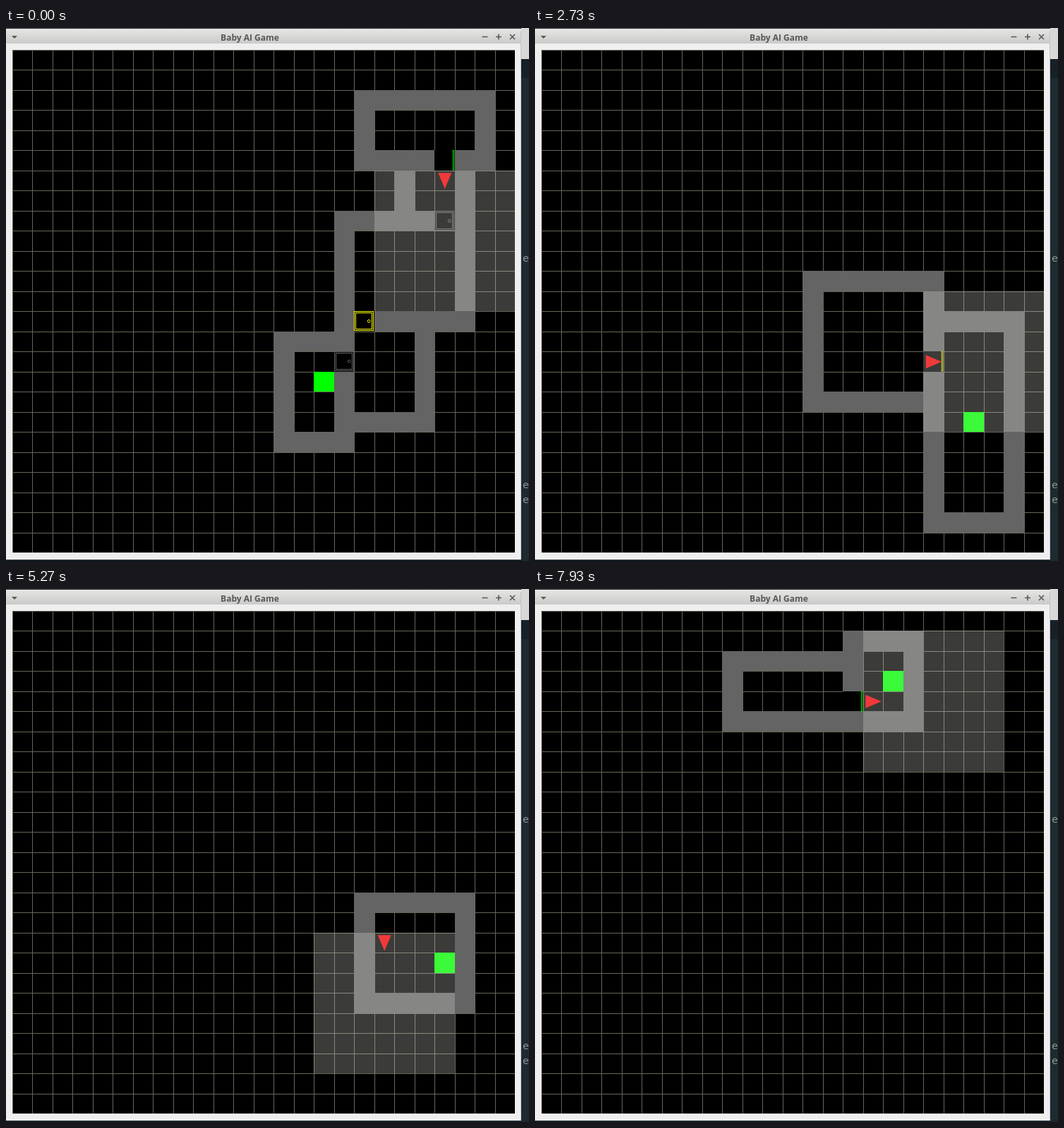
An HTML page with a canvas for the animation above (8000 ms loop, 741x755 px).

```html
<!DOCTYPE html>
<html lang="en">
<head>
<meta charset="utf-8">
<title>Baby AI Game</title>
<style>
html, body { margin: 0; width: 100%; height: 100%; overflow: hidden; background: #1d2a30; }
canvas { display: block; }
</style>
</head>
<body>
<canvas id="stage" width="741" height="755"></canvas>
<script>
const ctx = document.getElementById('stage').getContext('2d');
const CELL = 28.5, LEFT = 9, TOP = 31, SIZE = 25, VIEW = 7;
const STEP = 200 / 3, LOOP = 8000;
const RIGHT = 0, DOWN = 1, UP = 3;
const DX = [1, 0, -1, 0], DY = [0, 1, 0, -1];
const COLOR = {
  grey: '#646464', green: '#00ff00', yellow: '#ffff00',
  red: '#ff0000', purple: '#7027c3', blue: '#0000ff'
};

// rooms: wall box [x, y, w, h]; doors are listed in the order they are opened.
// moves: F forward, L/R turn, T open a door, W wait; lower case shares a step with the next move.
const levels = [
  { rooms: [[17, 2, 7, 4], [19, 5, 4, 4], [16, 8, 7, 6], [16, 13, 5, 6], [13, 14, 4, 6]],
    doors: [[21, 5, 'green'], [21, 8, 'grey'], [17, 13, 'yellow'], [16, 15, 'grey']],
    goal: [15, 16], start: [21, 6, DOWN], open: 1, moves: 'WFTFFFFFRFFFFLTFFFRTFFLF' },
  { rooms: [[19, 8, 5, 5]], doors: [],
    goal: [21, 10], start: [20, 11, UP], moves: 'FFRFRF' },
  { rooms: [[13, 11, 7, 7], [19, 13, 5, 11]], doors: [[19, 15, 'yellow']],
    goal: [21, 18], start: [14, 13, DOWN], moves: 'FFLFFFFTFFFRFF' },
  { rooms: [[4, 2, 5, 5], [8, 0, 6, 7], [13, 2, 7, 5], [19, 1, 4, 7], [18, 7, 4, 7]],
    doors: [[8, 3, 'green'], [13, 4, 'purple'], [19, 4, 'red'], [20, 7, 'grey']],
    goal: [19, 10], start: [6, 5, DOWN], moves: 'LLFFRFTFFfFFRFLTFFfFFFTFFRFFTFFfFR' },
  { rooms: [[17, 14, 6, 6]], doors: [],
    goal: [21, 17], start: [18, 16, DOWN], moves: 'LFFFR' },
  { rooms: [[2, 1, 6, 4], [3, 4, 5, 5], [2, 8, 7, 4], [0, 11, 6, 6]],
    doors: [[4, 4, 'blue'], [5, 8, 'red'], [4, 11, 'purple']],
    goal: [4, 13], start: [4, 3, UP], moves: 'RRTFFFFLFRTfFRFLFTFF' },
  { rooms: [[5, 7, 4, 7], [8, 7, 6, 4]], doors: [[8, 9, 'yellow']],
    goal: [9, 8], start: [6, 8, DOWN], moves: 'FLFTfFL' },
  { rooms: [[9, 2, 7, 4], [15, 1, 4, 5]], doors: [[15, 4, 'green']],
    goal: [17, 3], start: [13, 3, RIGHT], moves: 'RFLFTFF' }
];

// Play every level once and keep the state after each step.
const states = [];
for (const level of levels) {
  let [x, y, dir] = level.start, open = level.open || 0;
  const save = () => states.push({ level, x, y, dir, open });
  save();
  for (const move of level.moves) {
    const m = move.toUpperCase();
    if (m === 'F') { x += DX[dir]; y += DY[dir]; }
    if (m === 'L') dir = (dir + 3) % 4;
    if (m === 'R') dir = (dir + 1) % 4;
    if (m === 'T') open++;
    if (move === m) save();
  }
}

const px = i => Math.floor(LEFT + i * CELL);
const py = j => Math.floor(TOP + j * CELL);

function rect(x, y, w, h, fill) {
  ctx.fillStyle = fill;
  ctx.fillRect(x, y, w, h);
}

function cells(x, y, w, h, fill) {
  rect(px(x), py(y), px(x + w) - px(x), py(y + h) - py(y), fill);
}

function line(color, width, ...p) {
  ctx.strokeStyle = color;
  ctx.lineWidth = width;
  ctx.beginPath();
  for (let i = 0; i < p.length; i += 4) {
    ctx.moveTo(p[i], p[i + 1]);
    ctx.lineTo(p[i + 2], p[i + 3]);
  }
  ctx.stroke();
}

function triangle(color, ...p) {
  ctx.fillStyle = color;
  ctx.beginPath();
  for (let i = 0; i < 6; i += 2) ctx.lineTo(p[i], p[i + 1]);
  ctx.fill();
}

function drawWindow() {
  rect(0, 0, 741, 755, '#1d2a30');
  rect(730, 0, 11, 44, '#d8d8d8');
  rect(730, 44, 11, 27, '#172026');
  ctx.textAlign = 'left';
  ctx.fillStyle = '#8d979b';
  ctx.font = '15px "Noto Sans Mono", monospace';
  for (const y of [331, 652, 673]) ctx.fillText('e', 732, y);

  rect(0, 1, 730, 752, '#f0eff0');
  const bar = ctx.createLinearGradient(0, 1, 0, 22);
  bar.addColorStop(0, '#e6e6e4');
  bar.addColorStop(1, '#cacac8');
  rect(0, 1, 730, 21, bar);
  rect(729, 4, 1, 749, '#c4c4c4');

  ctx.textAlign = 'center';
  ctx.fillStyle = '#585858';
  ctx.font = 'bold 12px "Open Sans", "Noto Sans", sans-serif';
  ctx.fillText('Baby AI Game', 345.5, 18);
  triangle('#585858', 8, 11, 16, 11, 12, 15);
  line('#585858', 1.6, 674.5, 12.5, 682.5, 12.5, 694, 12.5, 702, 12.5, 698, 8.5, 698, 16.5,
    714, 9, 721, 16, 721, 9, 714, 16);
}

function drawDoor([x, y, name], open) {
  const left = px(x), top = py(y);
  cells(x, y, 1, 1, '#000');
  ctx.strokeStyle = COLOR[name];
  ctx.lineWidth = 1;
  if (open) {
    ctx.lineWidth = 0.8;
    ctx.strokeRect(left + 26.2, top + 0.5, 1.7, 27.5);
    return;
  }
  ctx.strokeRect(left + 0.5, top + 0.5, 27, 27);
  ctx.strokeRect(left + 2.5, top + 2.5, 23, 23);
  ctx.beginPath();
  ctx.arc(left + 21.2, top + 14.2, 1.9, 0, 7);
  ctx.stroke();
}

function drawAgent({ x, y, dir }) {
  ctx.save();
  ctx.translate(LEFT + (x + 0.5) * CELL, TOP + (y + 0.5) * CELL);
  ctx.rotate(dir * Math.PI / 2);
  triangle('#f03a3a', -11, -9.5, 11.5, 0, -11, 9.5);
  ctx.restore();
}

// The agent sees a square that begins at its own cell and extends ahead.
function drawView({ x, y, dir }) {
  const half = (VIEW - 1) / 2;
  const cx = x + DX[dir] * half, cy = y + DY[dir] * half;
  const x0 = Math.max(0, cx - half), x1 = Math.min(SIZE, cx + half + 1);
  const y0 = Math.max(0, cy - half), y1 = Math.min(SIZE, cy + half + 1);
  cells(x0, y0, x1 - x0, y1 - y0, 'rgba(235,235,228,.25)');
}

function drawState(state) {
  const { level, open } = state;
  cells(0, 0, SIZE, SIZE, '#000');
  for (let i = 0; i < SIZE; i++) {
    rect(px(i), TOP, 1, 712, '#66665a');
    rect(LEFT, py(i), 712, 1, '#66665a');
  }
  for (const [x, y, w, h] of level.rooms) {
    cells(x, y, w, 1, COLOR.grey);
    cells(x, y + h - 1, w, 1, COLOR.grey);
    cells(x, y, 1, h, COLOR.grey);
    cells(x + w - 1, y, 1, h, COLOR.grey);
  }
  level.doors.forEach((door, i) => drawDoor(door, i < open));
  cells(...level.goal, 1, 1, COLOR.green);
  drawView(state);
  drawAgent(state);
}

function frame(now) {
  const step = Math.floor((now % LOOP + 3.5) / STEP);
  drawWindow();
  drawState(states[Math.min(step, states.length - 1)]);
  requestAnimationFrame(frame);
}
requestAnimationFrame(frame);
</script>
</body>
</html>
```
